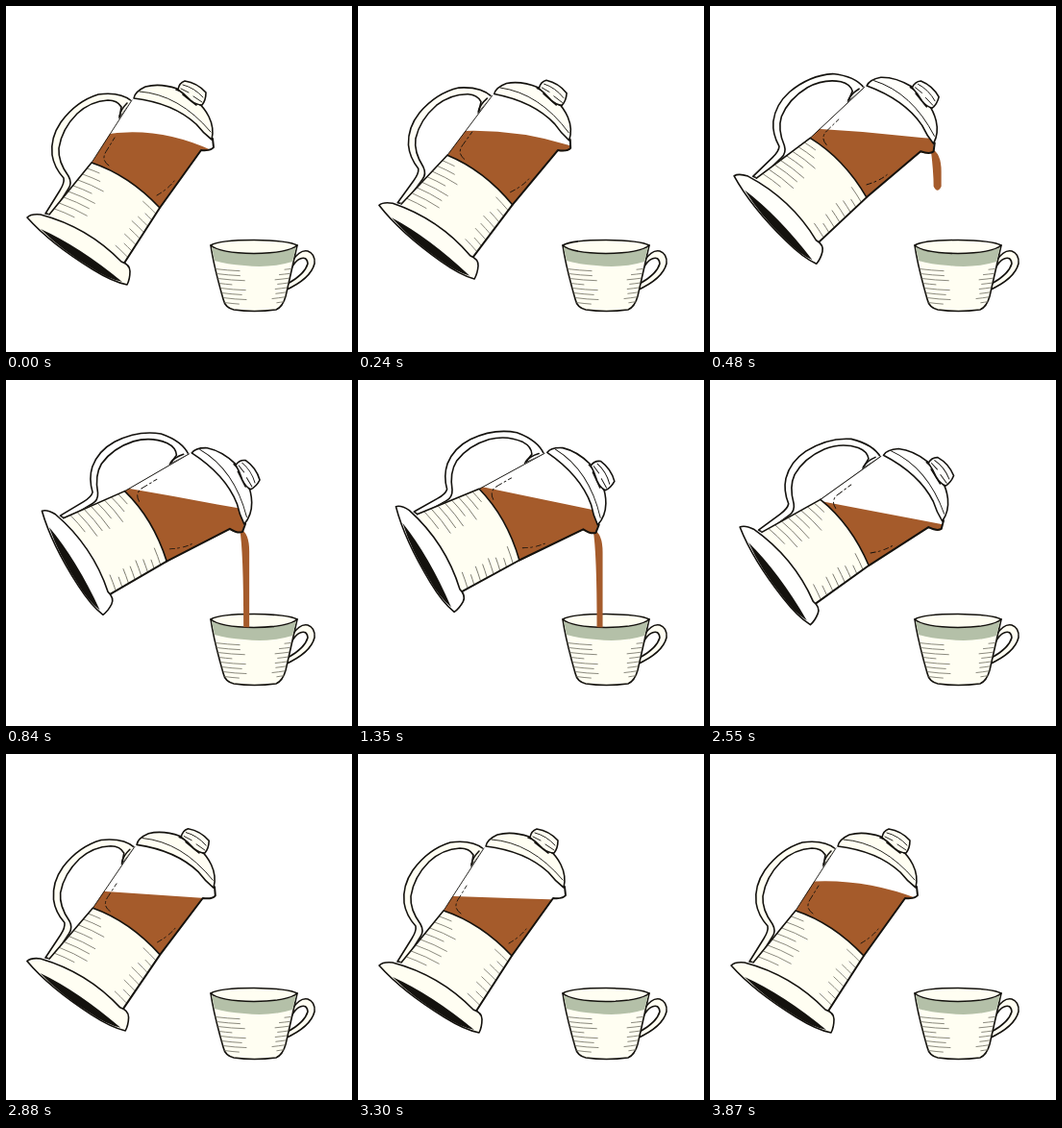
Write an HTML page that moves like this. It is 360 px wide and 360 px high and loops after 3.9 s.

```html
<!DOCTYPE html>
<html lang="en">
<head>
<meta charset="utf-8">
<title>Coffee press</title>
<style>
  html, body { margin: 0; width: 100%; height: 100%; overflow: hidden; background: #fff; }
  svg { display: block; width: 100%; height: 100%; }
  .ink { fill: none; stroke: #14120e; stroke-width: 1.6; stroke-linecap: round; stroke-linejoin: round; }
  .cream { fill: #fffef2; }
  .shell { fill: var(--shell); }
  .thin { stroke-width: .9; }
  .rib { fill: none; stroke: #77756a; stroke-width: .85; }
  .coffee { fill: #a55b2b; }
</style>
</head>
<body>
<svg viewBox="0 0 360 360">
  <defs>
    <clipPath id="glass">
      <path d="M89 163Q128 176 160 210L203 151Q213 151 216 148L214 138Q190 105 132 95Z"/>
    </clipPath>
    <clipPath id="aboveRim">
      <path d="M0 0H360V249H303Q294 257 258 257.500Q222 257 213 249H0Z"/>
    </clipPath>
  </defs>

  <g id="cup">
    <path class="ink cream" d="M298 265Q306 253 314 255Q322 258 321 268Q317 284 290 296L293 289Q311 279 314 268Q313 260 306 263Q301 265 297 273Z"/>
    <path class="ink cream" d="M213 249Q216 270 226 305Q228 314 237 316Q258 319 281 316Q288 313 291 302L303 249Z"/>
    <path fill="#b4c0a8" d="M214 251Q224 257 258 257.500Q292 257 302 251L298 266Q275 273 248 270Q230 269 217 265Z"/>
    <g id="cupRibs"></g>
    <path class="ink cream" d="M213 249Q222 243.500 258 243.500Q294 244 303 249Q294 257 258 257.500Q222 257 213 249Z"/>
  </g>

  <g clip-path="url(#aboveRim)"><path id="stream" class="coffee"/></g>

  <g id="press">
    <path class="ink shell" d="M131 99Q119 89 96 92Q73 99 57 121Q46 137 48 155Q50 168 60 179Q61 184 56 192L41 216L48 217L65 190Q69 184 65 177Q54 162 55 148Q58 128 74 112Q88 99 106 98Q116 98 120 105L118 117Z"/>
    <path class="ink" d="M118 115Q119 108 126 101"/>
    <path fill="#fff" d="M89 163Q128 176 160 210L203 151Q213 151 216 148L214 138Q190 105 132 95Z"/>
    <g clip-path="url(#glass)"><path id="liquid" class="coffee"/></g>
    <path class="ink thin" d="M131 98L89 163"/>
    <path class="ink thin" stroke-dasharray="7 3 2 3" d="M107 166Q98 160 105 150L113 137"/>
    <path class="ink thin" stroke-dasharray="5 3 2 4" d="M157 197Q169 190 175 182"/>
    <path class="cream" d="M89 163Q128 176 160 210L122 270Q85 236 44 217Z"/>
    <g id="pressRibs"></g>
    <path class="ink" d="M89 163L45 217M89 163Q128 176 160 210"/>
    <path class="ink" style="stroke-width:2" d="M215 138L216 147Q213 151 203 150L160 210L122 269"/>
    <path class="ink shell" d="M22 220Q26 216 36 217Q85 230 120 266Q129 269 129 276Q129 284 126 290Q111 287 90 274Q46 247 22 220Z"/>
    <path fill="#14120e" d="M36 232Q76 250 121 287Q106 284 88 272Q58 254 36 232Z"/>
    <path class="ink shell" d="M133 96Q134 89 145 84Q160 80 178 86Q202 97 211 115Q217 127 214 139Q205 132 198 123Q174 101 133 96Z"/>
    <path class="ink thin" d="M139 89Q180 92 213 131"/>
    <path class="ink" d="M177 87Q191 91 202 103M184 92L198 103"/>
    <path class="ink shell" d="M179 87Q180 80 186 78Q199 80 208 90Q208 98 204 103Q198 103 192 98Q185 91 179 87Z"/>
    <path class="ink thin" d="M184 82Q196 85 205 95M182 86L190 90M195 94L204 100"/>
  </g>
</svg>
<script>
const LOOP = 3900, PIVOT = [214, 212], BASE = [75, 255], LIP = [215, 147];
const TILT = 27.1, LEAN = 34, SKEW = 1.45;
const $ = id => document.getElementById(id);
const mix = (a, b, u) => a + (b - a) * u;
const clamp = u => Math.min(1, Math.max(0, u));
const ease = u => (1 - Math.cos(Math.PI * clamp(u))) / 2;

// Coffee surface: time, height at x = 100, height at x = 220, bulge.
const SURFACE = [
  [0, 134, 153, -10], [480, 127, 137, -1], [960, 102, 127, 0], [1350, 105, 130, 0],
  [1980, 109, 141, 0], [2550, 123, 146, 0], [2950, 147, 152, 0],
  [3300, 148, 152, 0], [3870, 133, 152, -7], [3900, 134, 153, -10]
];

let seed = 7;
const random = () => (seed = seed * 16807 % 2147483647) / 2147483647;

// Curved bands visible only near both walls.
function addRibs(parent, count, leftTop, leftEnd, rightTop, rightEnd, bend) {
  for (let i = 0; i < count; i++) {
    const u = (i + .5) / count;
    const [x1, y1, x2, y2] = [...leftTop, ...rightTop].map((v, k) => mix(v, [...leftEnd, ...rightEnd][k], u));
    const left = 16 + random() * 24, right = 8 + random() * 15;
    const rib = document.createElementNS("http://www.w3.org/2000/svg", "path");
    rib.setAttribute("class", "rib");
    rib.setAttribute("d", `M${x1} ${y1}Q${(x1 + x2) / 2 + bend[0]} ${(y1 + y2) / 2 + bend[1]} ${x2} ${y2}`);
    rib.setAttribute("pathLength", 100);
    rib.setAttribute("stroke-dasharray", `${left} ${100 - left - right} ${right}`);
    parent.append(rib);
  }
}
addRibs($("pressRibs"), 8, [87, 166], [48, 214], [158, 213], [124, 264], [4, -10]);
addRibs($("cupRibs"), 8, [217, 271], [228, 311], [297, 271], [289, 310], [0, 5]);

function surfaceAt(t) {
  const i = SURFACE.findIndex(key => key[0] > t);
  const a = SURFACE[i - 1], b = SURFACE[i];
  const u = (t - a[0]) / (b[0] - a[0]);
  return [1, 2, 3].map(k => mix(a[k], b[k], u));
}

// Turns the press about its pivot while the top leans slightly towards the spout.
function pose(tilt, lean) {
  return new DOMMatrix()
    .translate(...PIVOT).rotate(TILT * tilt).translate(-PIVOT[0], -PIVOT[1])
    .translate(...BASE).rotate(LEAN).skewX(-SKEW * lean).rotate(-LEAN).translate(-BASE[0], -BASE[1]);
}

function streamPath(t, { x, y }) {
  if (t < 370 || t > 2420) return "";
  const top = y - 3;
  if (t > 2230) {
    const tail = top + 112 * clamp((t - 2230) / 190) ** 2;
    return `M250 ${tail}Q254 ${tail + 8} 254 ${tail + 16}V262H248.5V${tail + 10}Z`;
  }
  const end = Math.min(262, y + 40 * ((t - 370) / 110) ** 1.6);
  const half = end < 250 ? 4 : 3;
  const left = x + 5 - half, right = x + 5 + half;
  const shoulder = Math.min(top + 24, mix(top, end, .65));
  return `M${x - 2} ${top}Q${right} ${top + 4} ${right} ${shoulder}V${end - 4}` +
    `Q${x + 5} ${end + 4} ${left} ${end - 4}Q${left} ${shoulder} ${x - 2} ${top}Z`;
}

function draw(t) {
  const tilt = ease(t / 990) - ease((t - 2340) / 630);
  const lean = 1 - (1 - tilt) ** 2;
  const matrix = pose(tilt, lean);
  const [left, right, bulge] = surfaceAt(t);
  const slope = (right - left) / 120;
  $("press").style.setProperty("--shell", `rgb(255 ${254 + lean} ${242 + 13 * lean})`);
  $("press").setAttribute("transform", matrix);
  $("liquid").setAttribute("transform", matrix.inverse());
  $("liquid").setAttribute("d",
    `M40 ${left - slope * 60}L100 ${left}Q160 ${(left + right) / 2 + 2 * bulge} 220 ${right}L280 ${right + slope * 60}V300H40Z`);
  $("stream").setAttribute("d", streamPath(t, matrix.transformPoint(new DOMPoint(...LIP))));
}

const start = performance.now();
function tick() {
  draw((performance.now() - start) % LOOP);
  requestAnimationFrame(tick);
}
tick();
</script>
</body>
</html>
```
